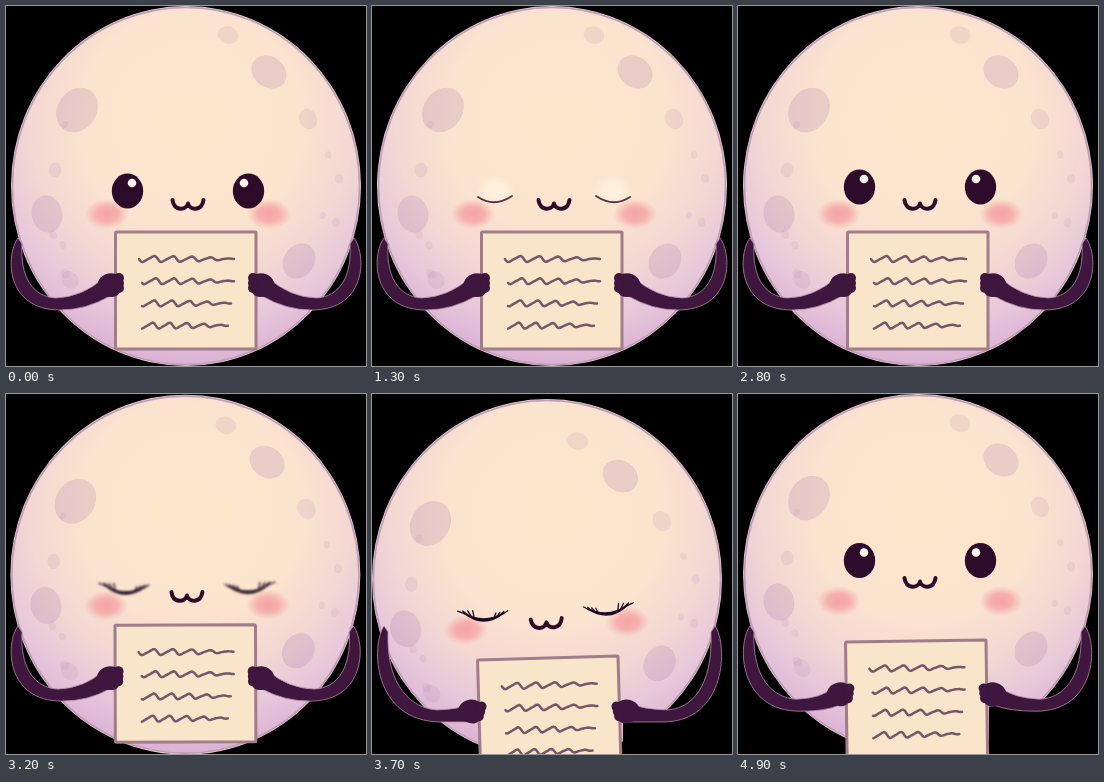
An HTML page that plays this animation: 360 by 360 pixels, repeating every 5000 ms.

```html
<!DOCTYPE html>
<html>
<head>
<meta charset="utf-8">
<style>
html, body { margin: 0; width: 100%; height: 100%; overflow: hidden; background: #000; }
svg { display: block; width: 100vw; height: 100vh; }
</style>
</head>
<body>
<svg viewBox="0 0 360 360">
  <defs>
    <radialGradient id="skin" gradientUnits="userSpaceOnUse" cx="186" cy="116" r="252">
      <stop offset="0" stop-color="#fde7cc"/>
      <stop offset=".42" stop-color="#fbe4ce"/>
      <stop offset=".64" stop-color="#f3d8d3"/>
      <stop offset=".82" stop-color="#e6c6da"/>
      <stop offset="1" stop-color="#d8acd3"/>
    </radialGradient>
    <radialGradient id="pink">
      <stop offset="0" stop-color="#f5a2a3"/>
      <stop offset=".5" stop-color="#f5a5a4" stop-opacity=".8"/>
      <stop offset="1" stop-color="#f5a8a5" stop-opacity="0"/>
    </radialGradient>
    <radialGradient id="cover">
      <stop offset=".4" stop-color="#fff0de"/>
      <stop offset="1" stop-color="#fff0de" stop-opacity="0"/>
    </radialGradient>
    <filter id="smear" x="-50%" y="-50%" width="200%" height="200%"><feGaussianBlur stdDeviation="1 2.2"/></filter>
    <filter id="soft" x="-50%" y="-50%" width="200%" height="200%"><feGaussianBlur stdDeviation="1"/></filter>
  </defs>

  <g id="moon">
    <ellipse cx="180" cy="180" rx="175" ry="180" fill="#e3cbd2"/>
    <ellipse cx="180" cy="180" rx="173.500" ry="178.500" fill="url(#skin)" stroke="#c19cb5" stroke-width="1.600"/>
  </g>
  <g id="craters" fill="#b283ae" stroke="#a878a8"></g>

  <g id="face" stroke-linecap="round" stroke-linejoin="round">
    <g id="half">
      <ellipse id="cheek" cx="101" cy="208" rx="22" ry="15" fill="url(#pink)"/>
      <g id="eye">
        <g id="open">
          <ellipse cx="121.500" cy="185" rx="15.700" ry="17.500" fill="#2d0b2b"/>
          <circle cx="126" cy="177" r="4.300" fill="#fff3ea"/>
        </g>
        <g id="lid" fill="none" stroke="#54384a" stroke-width="1.800">
          <ellipse cx="123" cy="184" rx="20" ry="15" fill="url(#cover)" stroke="none"/>
          <path d="M106 191Q122 202 140 190"/>
        </g>
        <g id="lashes" fill="none" stroke="#1e0820"></g>
      </g>
    </g>
    <use href="#half" transform="translate(364 0) scale(-1 1)"/>
    <g id="lips">
      <path id="smile" d="M166.500 194C168 205 180 205 182 197.500C184 205 196 205 197.500 194" fill="none" stroke="#2d0b2b" stroke-width="4"/>
      <g id="gape" filter="url(#soft)">
        <ellipse cx="182" cy="208" rx="8" ry="5" fill="#e391a4"/>
        <path d="M166 194Q168 206 182 206Q196 206 198 194Q182 202 166 194Z" fill="#594049" stroke="#594049" stroke-width="2"/>
      </g>
    </g>
  </g>

  <path id="gap" d="M251 304L330 300V360H251Z"/>
  <g id="paper">
    <rect x="109.500" y="226" width="140.500" height="117" rx="1" fill="#f9e5ca" stroke="#a17c8a" stroke-width="3"/>
    <g id="lines" fill="none" stroke="#765669" stroke-width="2.500" stroke-linecap="round" stroke-linejoin="round"></g>
  </g>
  <g id="arms" fill="#3f163d" stroke-linejoin="round"></g>
</svg>
<script>
const $ = id => document.getElementById(id);
const move = (id, x, y, turn = '') => $(id).setAttribute('transform', `translate(${x} ${y}) ${turn}`);
const show = (id, on) => $(id).style.display = on ? '' : 'none';
const blur = (id, name) => $(id).style.filter = name ? `url(#${name})` : '';
const range = n => [...Array(n).keys()];

// Craters are flattened along the radius of the moon
function crater(x, y, r, opacity) {
  const a = Math.atan2(y - 180, x - 180) * 180 / Math.PI;
  return `<ellipse rx="${r * .82}" ry="${r}" opacity="${opacity}" transform="translate(${x} ${y}) rotate(${a})"/>`;
}
let seed = 5;
const rand = () => (seed = seed * 16807 % 2147483647) / 2147483647;
const big = [[71, 104, 23], [263, 66, 18], [41, 208, 18], [293, 255, 18], [222, 29, 10], [302, 113, 10], [49, 164, 7], [64, 274, 9]];
$('craters').innerHTML =
  big.map(([x, y, r]) => crater(x, y, r, r > 12 ? .24 : .15)).join('') +
  range(8).map(i => {
    const a = (i % 2 ? 0 : Math.PI) + (rand() - .5) * 1.2, d = 130 + 25 * rand();
    return crater(180 + d * Math.cos(a), 185 + d * Math.sin(a), 3 + 2 * rand(), .13);
  }).join('');

// Scribbled text: waves that flatten to the right
$('lines').innerHTML = range(4).map(n => {
  const left = n ? 136 : 133, width = 96 - 3 * n;
  const points = range(width).map(x => {
    const u = x / width, p = u * 32 + n * .4;
    const h = 3 * (1 - u ** 3) * Math.sin(p + .5 * Math.sin(p));
    return `${left + x} ${(253 + 22.2 * n + h).toFixed(1)}`;
  });
  return `<path d="M${points.join('L')}"/>`;
}).join('');

// Lashes fan out from both ends of the closed lid
$('lashes').innerHTML = '<path d="M100 187Q119 200 140 189Q119 204 100 187Z" fill="#1e0820" stroke-width="1.500"/>' +
  range(4).map(i => `<path stroke-width="1.300" d="M${101 + 3 * i} ${188 + 1.3 * i}l${2 * i - 7} ${-3 - 1.2 * i}
    M${139 - 3 * i} ${190 + i}l${5 - i} ${-3 - i * .4}"/>`).join('');

// Eased value at t from [time, value] keys
function track(t, ...keys) {
  let [t0, v0] = keys[0];
  for (const [t1, v1] of keys) {
    if (t < t1) {
      const u = Math.max(0, (t - t0) / (t1 - t0));
      return v0 + (v1 - v0) * u * u * (3 - 2 * u);
    }
    [t0, v0] = [t1, v1];
  }
  return v0;
}

// Left arm: the hand drops by d and shifts by dx, the shoulder shifts by sx
function arm(d, dx, sx) {
  const y = 304 + d * .63, x = 54 + d * .4, hx = 104 + dx, hy = 279 + d;
  return `<path stroke="#b58aa8" stroke-width=".8" d="M${12 + sx} 232C${sx - 1} 250 ${sx} ${y} ${x} ${y}
    Q${x + 26} ${y} ${hx} ${hy + 11}L${hx - 6} ${hy - 7}Q${x + 22} ${y - 13} ${x - 4} ${y - 12}
    C${x - 28} ${y - 13} ${14 + sx} ${y - 34} ${16 + sx} 238Z"/>
    <g transform="translate(${hx} ${hy}) rotate(${d * .4})"><ellipse rx="13" ry="11.500" transform="rotate(-25)"/>
    <ellipse cx="2" cy="6" rx="8" ry="6"/>${range(3).map(i => `<circle cx="9" cy="${5 * i - 7}" r="5"/>`).join('')}</g>`;
}

function draw() {
  const t = Math.floor(performance.now() % 5000 / 100) * 100;
  const nod = track(t, [2900, 0], [3200, .13], [3700, 1], [3900, 1], [4300, .1], [4700, 0]);
  const rise = track(t, [3900, 0], [4300, 1]);
  const sway = track(t, [1500, 0], [2600, 1], [2900, 1], [3200, 0]);
  const open = track(t, [1100, 1], [1300, 0], [1500, 1], [3000, 1], [3200, 0], [4100, 0], [4300, 1]);
  const lean = nod + rise / 2, drop = 38 * nod + 21 * rise;
  const tilt = `rotate(${-2.8 * nod} 180 179)`;

  move('moon', -5 * nod, 5 * nod);
  move('craters', -9 * nod, 20 * nod, tilt);
  move('face', -9 * nod, 21 * nod, tilt);
  move('cheek', 0, 3 * nod - rise);
  move('eye', 0, 7 * nod - 18.5 * rise - 4 * sway);
  move('lips', 0, 10 * nod - 10 * rise);
  move('paper', -4 * lean, drop, `rotate(${-1.6 * lean} 180 226)`);
  move('open', 0, 194 * (1 - open), `scale(1 ${open})`);

  const closed = open < .2, waking = t >= 4200 && t <= 4300;
  show('open', !closed);
  show('lid', closed && t < 2000);
  show('lashes', closed && t > 2000);
  show('smile', !waking);
  show('gape', waking);
  show('gap', drop > 15);
  blur('open', waking && 'smear');
  blur('lashes', t === 3200 && 'soft');
  blur('lines', waking && 'soft');

  $('gap').setAttribute('transform', `translate(0 ${drop * .4})`);
  $('arms').innerHTML = arm(drop, -5 * lean, 0) +
    `<g transform="translate(360 0) scale(-1 1)">${arm(drop, lean, 5 * nod + rise)}</g>`;
  requestAnimationFrame(draw);
}
draw();
</script>
</body>
</html>
```
